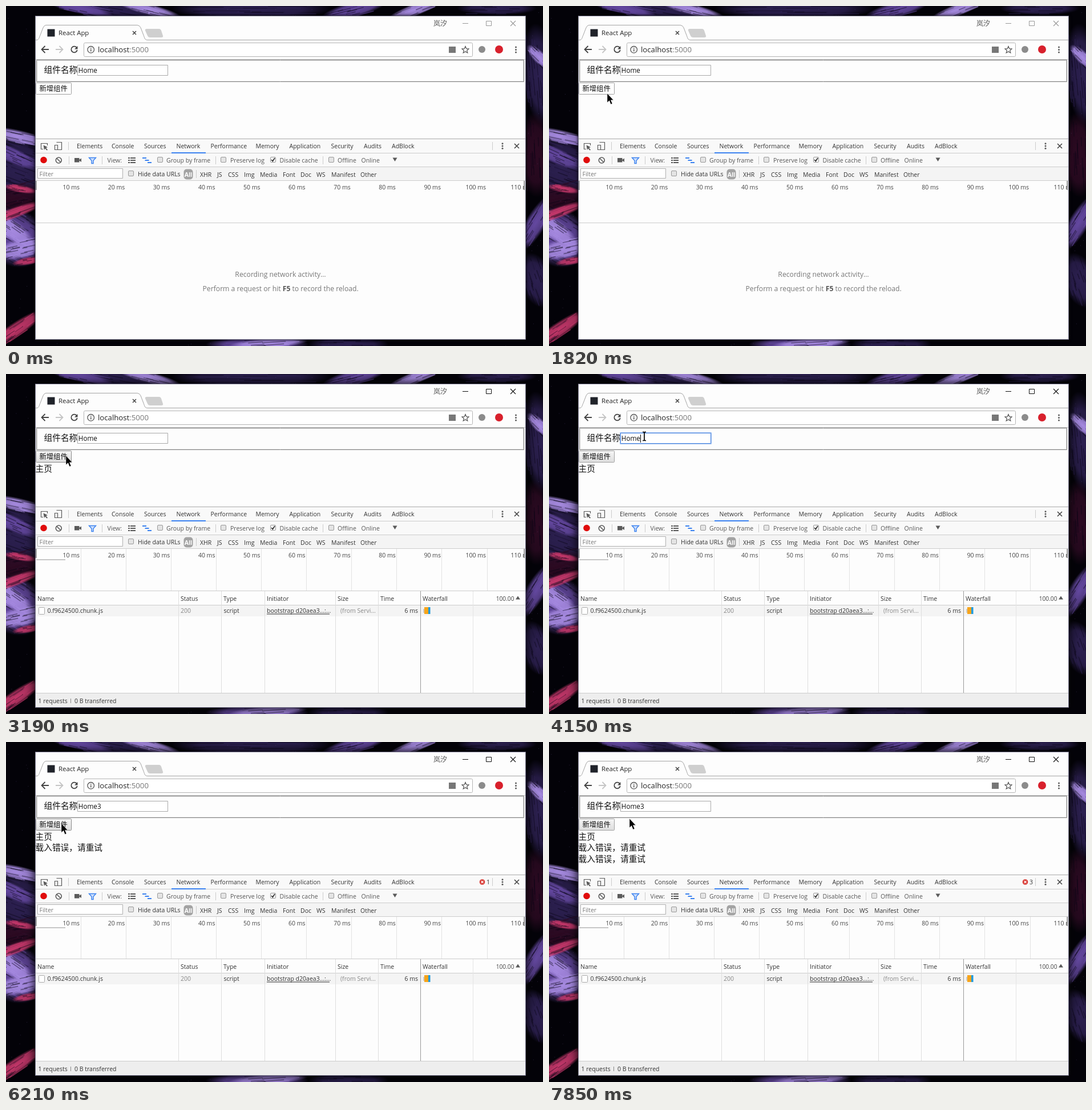
These frames come from a looping animation (941x595 px, 8 s). An HTML page with a canvas:

```html
<!DOCTYPE html>
<html lang="zh-CN">
<head>
<meta charset="utf-8">
<title>React App</title>
<style>
html, body { margin: 0; height: 100%; overflow: hidden; background: #000 }
canvas { display: block }
</style>
</head>
<body>
<canvas id="stage" width="941" height="595"></canvas>
<script>
const LOOP = 8000, W = 941, H = 595;
const FONT = '"Open Sans","Noto Sans CJK SC","Noto Sans CJK",sans-serif';
const PAPER = '#fdfdfd', LINE = '#cccccc', INK = '#333', ICON = '#5a5a5a', BLUE = '#3b82f0';
const stage = document.getElementById('stage').getContext('2d');
let c = stage;

// ---- helpers ----
function text(s, x, y, size = 10.5, color = INK, align = 'left', weight = 400) {
  c.font = `${weight} ${size}px ${FONT}`;
  c.fillStyle = color;
  c.textAlign = align;
  c.fillText(s, x, y);
}
function rect(x, y, w, h, color) {
  c.fillStyle = color;
  c.fillRect(x, y, w, h);
}
function box(x, y, w, h, border, fill, radius = 0) {
  c.beginPath();
  c.roundRect(x + .5, y + .5, w - 1, h - 1, radius);
  paint(fill, border);
}
function paint(fill, border, width = 1) {
  if (fill) { c.fillStyle = fill; c.fill(); }
  if (border) { c.strokeStyle = border; c.lineWidth = width; c.stroke(); }
}
function dot(x, y, r, fill, border, width) {
  c.beginPath();
  c.arc(x, y, r, 0, 7);
  paint(fill, border, width);
}
function shape(d, fill, border, width, x = 0, y = 0) {
  const p = new Path2D(d);
  c.save();
  c.translate(x, y);
  if (fill) { c.fillStyle = fill; c.fill(p); }
  if (border) { c.strokeStyle = border; c.lineWidth = width || 1; c.stroke(p); }
  c.restore();
}
function kebab(x, y, gap) {
  for (const k of [-1, 0, 1]) dot(x, y + k * gap, 1.5, ICON);
}
function checkbox(x, y, on) {
  box(x, y, 10, 10, '#999', on ? '#fff' : '#e4e4e4', 1.5);
  if (on) shape('M2 5L4.3 7.5L8 2', null, '#333', 1.8, x, y);
}

// ---- wallpaper: soft streaks, each combed with fine strands ----
function makeWallpaper() {
  const canvas = document.createElement('canvas');
  canvas.width = W;
  canvas.height = H;
  c = canvas.getContext('2d');
  rect(0, 0, W, H, '#030208');
  let seed = 7;
  const random = () => (seed = seed * 16807 % 2147483647) / 2147483647;
  const spread = () => random() * 2 - 1;
  // centre x, centre y, half length, half width, degrees
  const streaks = {
    '#2c2050': [20, 285, 60, 60, 20, 430, 5, 140, 20, 0, 935, 120, 90, 30, 85, 600, 592, 70, 16, 0, 930, 480, 50, 30, 70, 180, 6, 110, 18, 10, 860, 4, 70, 12, 0],
    '#2c0a22': [928, 260, 75, 30, 88, 15, 335, 50, 25, -15],
    '#6448a0': [15, 405, 60, 50, 30, 12, 262, 50, 14, 25, 130, 4, 60, 10, 12, 928, 380, 60, 18, -58, 610, 6, 60, 14, -15, 440, 592, 90, 13, 0],
    '#a68ae0': [18, 228, 60, 12, 12, 10, 392, 45, 18, 35, 25, 425, 45, 18, -12, 250, 6, 60, 10, 14, 718, 6, 60, 11, -22, 460, 590, 70, 9, -4, 935, 90, 30, 11, 45],
    '#c4376a': [12, 363, 60, 10, -20, 40, 446, 30, 7, -10, 15, 568, 65, 13, -34, 25, 320, 30, 7, 10]
  };
  for (const [color, list] of Object.entries(streaks))
    for (let i = 0; i < list.length; i += 5) {
      const [x, y, len, wide, angle] = list.slice(i, i + 5);
      c.save();
      c.translate(x, y);
      c.rotate(angle * Math.PI / 180);
      c.scale(len, wide);
      const glow = c.createRadialGradient(0, 0, 0, 0, 0, 1);
      glow.addColorStop(0, color);
      glow.addColorStop(.65, color + 'd0');
      glow.addColorStop(1, color + '00');
      rect(-1, -1, 2, 2, glow);
      for (let k = 0; k < wide * 1.5; k++) {
        const v = spread() * .85, u = spread() * .6;
        rect(u - .25, v, .2 + random() * .4, 1.5 / wide, k % 2 ? color + 'a0' : '#08041470');
      }
      c.restore();
    }
  for (let i = 0; i < 500; i++) rect(random() * W, random() * H, 1, 1, '#7a68a850');
  c = stage;
  return canvas;
}
const wallpaper = makeWallpaper();

// ---- browser window ----
function drawChrome(active) {
  c.save();
  c.shadowColor = '#000';
  c.shadowBlur = active ? 16 : 5;
  rect(51, 17, 860, 567, '#77758c');
  c.restore();
  rect(52, 18, 858, 565, PAPER);

  const control = active ? '#111' : '#999';
  text('岚汐', 749, 35, 12, '#555');
  rect(800, 30, 10, 1, control);
  box(841, 26, 10, 9, control);
  shape('M884 26l9 9M893 26l-9 9', null, control, 1.1);

  shape('M52 59.5H54C58 59 58 55 60 51L65 38Q67 33.5 70 33.5H230Q234 33.5 236 38L241 51C243 56 243 59.5 248 59.5H910', null, '#a5a5a5');
  shape('M247 40H268Q271 40 272 43L275 52Q276 55 272 55H253Q249 55 248 52L244 43Q243 40 247 40Z', '#cfcfcf');
  box(72, 40, 14, 14, null, '#20232a');
  text('React App', 92, 51, 11.4, '#222');
  shape('M222 44l6 6M228 44l-6 6', null, '#444', 1.5);

  shape('M75 76H63M68.5 70L62.5 76L68.5 82', null, '#444', 1.8);
  shape('M87 76H99M93.5 70L99.5 76L93.5 82', null, '#c5c5c5', 1.8);
  shape('M124 73A5.3 5.3 0 1 0 124.8 77', null, '#444', 1.8);
  shape('M125.5 70V75.5H120Z', '#444');
  box(136, 64, 682, 25, '#b4b4b4', '#fff', 2);
  dot(148.7, 76.3, 5.8, null, '#555', 1.3);
  rect(148, 75.5, 1.5, 4, '#555');
  rect(148, 73, 1.5, 1.5, '#555');
  text('localhost', 161, 81, 13.2, '#222');
  text(':5000', 161 + c.measureText('localhost').width, 81, 13.2, '#777');
  rect(776, 71, 12, 11, '#777');
  shape('M805 70.5L806.7 74.6L811 75L807.7 77.8L808.8 82L805 79.7L801.2 82L802.3 77.8L799 75L803.3 74.6Z', null, '#555', 1.2);
  dot(834, 76, 6, '#8b8b8b');
  dot(864, 76, 7, '#d8202c');
  kebab(893.5, 76.5, 4.5);
  rect(52, 93, 858, 1, '#c4c4c4');
}

// ---- web page ----
function drawPage(t) {
  const focused = t >= 4150 && t < 6210;
  box(53, 94, 855, 39, '#858585');
  box(54, 95, 853, 37, '#dcdcdc');
  text('组件名称', 66.5, 117, 14.7, '#111');
  box(125, 103, 159, 19, focused ? '#4d88e0' : '#a9a9a9', '#fff');
  if (focused) box(124, 102, 161, 21, '#9dbdf0');
  text(t < 5120 ? 'Home' : 'Home3', 126.8, 117, 11.7, '#111');
  if (t >= 4150 && t < 4710) rect(160, 106, 1, 14, '#000');
  if (t >= 5120 && t < 5630) rect(167, 106, 1, 14, '#000');

  const hover = t >= 1970 && t < 3610 || t >= 5780 && t < 7850;
  const pressed = t >= 7170 && t < 7320;
  const face = c.createLinearGradient(0, 134, 0, 154);
  face.addColorStop(0, pressed ? '#ddd' : '#f6f6f6');
  face.addColorStop(1, pressed ? '#eee' : '#dedede');
  box(52, 134, 63, 21, hover ? '#8a8a8a' : '#a0a0a0', t < 2510 ? PAPER : face, 1);
  text('新增组件', 58.5, 149, 12.3, '#111');

  if (t >= 2510) text('主页', 51.5, 170.5, 14.7, '#111');
  if (t >= 6210) text('载入错误，请重试', 51.5, 190, 14.7, '#111');
  if (t >= 7320) text('载入错误，请重试', 51.5, 209.5, 14.7, '#111');
}

// ---- developer tools ----
const tabs = { Elements: 124, Console: 185, Sources: 242, Network: 298.5, Performance: 358.5, Memory: 437.5,
  Application: 496.5, Security: 569.5, Audits: 627, AdBlock: 676 };
const filters = { XHR: 340, JS: 370, CSS: 389, Img: 417, Media: 445, Font: 485, Doc: 516, WS: 544, Manifest: 570, Other: 621 };

function drawTools(errors) {
  rect(52, 233, 858, 49, '#f9f9f9');
  rect(52, 282, 858, 23, '#f4f4f4');
  for (const y of [232, 257, 281, 305, 379]) rect(52, y, 858, 1, y === 232 ? '#aaa' : LINE);

  shape('M72.5 244V240.5H61.5V250.5H65', null, ICON, 1.2);
  shape('M65.5 243.5L73 247L70 248.3L73 251.5L71.7 252.7L68.5 249.5L67 252Z', ICON);
  shape('M88.5 238.5H97.5V251.5H91M85.5 243.5H90.5V251.5H85.5Z', null, ICON, 1.2);
  for (const x of [109, 852]) rect(x, 238, 1, 14, LINE);
  for (const name in tabs) text(name, tabs[name], 249);
  rect(290, 256, 60, 2, BLUE);
  kebab(870, 245, 4.3);
  shape('M891 241l8 8M899 241l-8 8', null, '#444', 1.6);
  if (errors) {
    dot(834.5, 245, 4.8, '#d93a35');
    shape('M832.5 243l4 4M836.5 243l-4 4', null, '#fff', 1.2);
    text(errors, 842, 249);
  }

  dot(66, 269.5, 5.8, '#e00b0b');
  dot(92.3, 270, 5, null, ICON, 1.6);
  shape('M88.8 266.5l7 7', null, ICON, 1.6);
  shape('M120 266H128.5V269L132 266.5V273L128.5 270.5V273.5H120Z', ICON);
  shape('M145.5 265.5H157.5L153 270.5V275.5H150V270.5Z', '#cfe0fb', BLUE, 1.4);
  for (const x of [110, 168, 367, 555]) rect(x, 263, 1, 14, LINE);
  const labels = { 'View:': 177.5, 'Group by frame': 281, 'Preserve log': 393, 'Disable cache': 479.5, Offline: 581, Online: 622.5 };
  for (const name in labels) text(name, labels[name], 274, 10.5, '#555');
  for (const y of [265, 269, 273]) {
    rect(214, y, 3, 2, ICON);
    rect(218, y, 9, 2, ICON);
  }
  for (const k of [0, 1, 2]) rect(239 + k * 4.5, 265 + k * 4, 7, 2, BLUE);
  for (const x of [265, 376, 463, 565]) checkbox(x, 264, x === 463);
  shape('M677.5 265.5H685.5L681.5 272Z', ICON);

  box(55, 284, 150, 18, '#b0b0b0', '#fff');
  text('Filter', 58.5, 298, 10.5, '#777');
  checkbox(214, 288);
  text('Hide data URLs', 231, 298);
  box(311, 285, 17, 19, null, '#a3a3a3', 5);
  text('All', 319.5, 299, 10.5, '#fff', 'center', 700);
  rect(333, 287, 1, 14, LINE);
  for (const name in filters) text(name, filters[name], 299);
}

function drawRuler(loaded) {
  c.save();
  c.beginPath();
  c.rect(52, 306, 856, 73);
  c.clip();
  for (let k = 1; k <= 11; k++) {
    const x = 51.5 + 79.1 * k;
    if (loaded) rect(Math.round(x), 306, 1, 73, '#e2e2e2');
    text(k * 10 + ' ms', x - 1.5, 321, 10.5, '#444', 'right');
  }
  c.restore();
  if (loaded) rect(53, 324, 51, 2, '#c6c6c6');
  rect(52, 306, 1.5, 16, '#777');
  rect(907.5, 306, 1.5, 16, '#777');
}

function drawEmptyLog() {
  const grey = '#777';
  text('Recording network activity…', 481, 473.5, 12.2, grey, 'center');
  let x = 344.5;
  [['Perform a request or hit ', 400], ['F5', 700], [' to record the reload.', 400]].forEach(([part, weight]) => {
    text(part, x, 499, 12.2, weight === 700 ? '#555' : grey, 'left', weight);
    x += c.measureText(part).width;
  });
}

const columns = { Name: 52, Status: 302, Type: 377, Initiator: 453, Size: 577, Time: 652, Waterfall: 726 };
function drawRequests() {
  rect(52, 405, 858, 19, '#f4f4f4');
  rect(52, 404, 858, 1, LINE);
  for (const name in columns) {
    const x = columns[name];
    if (x > 52) rect(x, 380, 1, 178, name === 'Waterfall' ? '#999' : '#dedede');
    text(name, x + (x > 52 ? 4 : 3), 397);
  }
  rect(818, 380, 1, 178, '#e4e4e4');
  text('100.00', 890.5, 397, 10.2, '#444', 'right');
  shape('M893 394.5H901L897 388.5Z', ICON);

  box(57, 408, 11, 13, '#aaa', '#fff', 1);
  text('0.f9624500.chunk.js', 72.5, 418);
  text('200', 306, 418, 10.5, '#888');
  text('script', 381.5, 418);
  text('bootstrap d20aea3...:...', 457, 418);
  rect(457, 419.5, 110, 1, INK);
  text('(from Servi...', 586, 418, 10.5, '#888');
  text('6 ms', 722, 418, 10.5, INK, 'right');
  rect(731, 411, 2, 7, '#ccc');
  rect(733, 408, 7, 12, '#f8a51b');
  rect(740, 408, 3.5, 12, '#1e9be0');

  rect(52, 558, 858, 25, '#eeeeee');
  rect(52, 558, 858, 1, LINE);
  text('1 requests', 56.5, 576);
  rect(113, 568, 1, 8, '#888');
  text('0 B transferred', 120, 576);
}

// ---- pointer ----
const pointers = {
  arrow(x, y) {
    shape('M0 0V16L3.7 12.6L6.3 19L9 18L6.4 11.7H11Z', '#000', '#ffffffb0', .7, x, y);
  },
  beam(x, y) {
    shape('M-3 -7.5H-1L0 -6.5L1 -7.5H3M0 -6.5V6.5M-3 7.5H-1L0 6.5L1 7.5H3', null, '#000', 1.7, x, y);
  },
  hand(x, y) {
    const fingers = 'M3 14L8 19M9 14L6 5.5M11.5 13L11 3M15 13L16 4M18 14L21 8M8 14L18 13L19 16L17 22H10L6 16Z';
    c.lineCap = c.lineJoin = 'round';
    shape(fingers, null, '#000', 4.6, x - 12, y - 12);
    shape(fingers, '#fff', '#fff', 2.5, x - 12, y - 12);
    c.lineCap = 'butt';
    c.lineJoin = 'miter';
  }
};
const moves = [
  [870, 'arrow', 0, 335], [990, 'hand', 62, 321], [1140, 'hand', 80, 313], [1280, 'hand', 250, 315],
  [1430, 'arrow', 205, 235], [1550, 'arrow', 145, 188], [1670, 'arrow', 105, 160], [1820, 'arrow', 102, 153],
  [1970, 'arrow', 100, 146], [2090, 'arrow', 99, 142], [3190, 'arrow', 105, 143], [3340, 'arrow', 113, 139],
  [3460, 'arrow', 121, 132], [3610, 'arrow', 137, 123], [3760, 'beam', 150, 115], [3880, 'beam', 161, 111],
  [4000, 'beam', 167, 109], [5270, 'arrow', 160, 134], [5390, 'arrow', 145, 165], [5510, 'arrow', 118, 175],
  [5630, 'arrow', 104, 160], [5780, 'arrow', 98, 145], [5900, 'arrow', 97, 142.5], [7850, 'arrow', 141, 134]
];

function draw(t) {
  const loaded = t >= 2510;
  c.drawImage(wallpaper, 0, 0);
  drawChrome(t >= 2390);
  drawPage(t);
  drawTools(t >= 7320 ? 3 : t >= 6210 ? 1 : 0);
  drawRuler(loaded);
  loaded ? drawRequests() : drawEmptyLog();
  const move = moves.findLast(m => m[0] <= t);
  if (move) pointers[move[1]](move[2], move[3]);
}
const start = performance.now();
function tick() {
  draw((performance.now() - start) % LOOP);
  requestAnimationFrame(tick);
}
tick();
</script>
</body>
</html>
```
